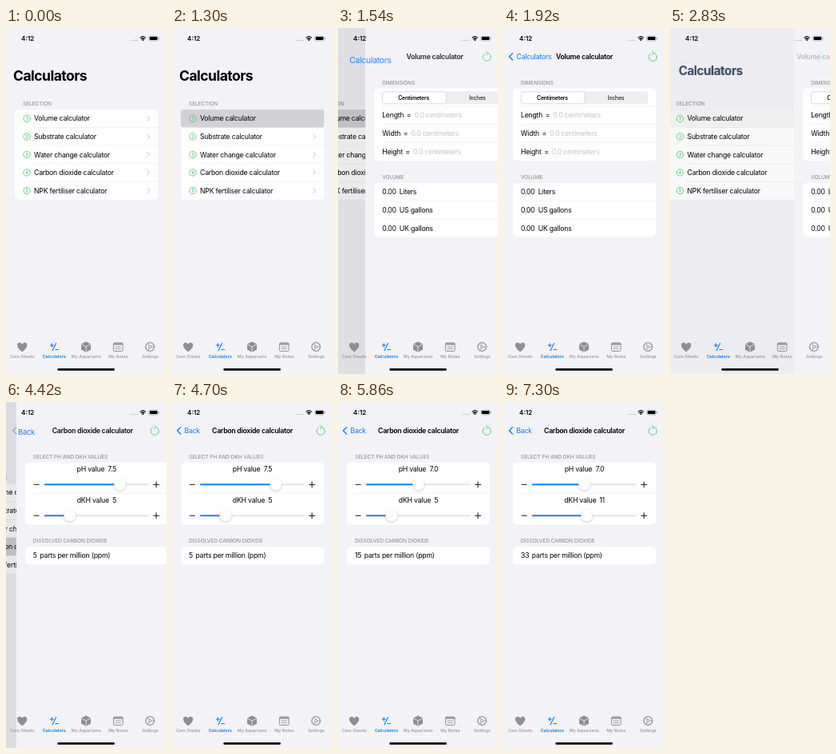
Recreate the animation shown at these times as an HTML page. Size 200x433 px, loop 8 s.

```html
<!DOCTYPE html>
<html lang="en">
<head>
<meta charset="utf-8">
<title>Calculators</title>
<style>
  html, body { margin: 0; width: 100%; height: 100%; overflow: hidden; background: #f2f2f7; }
  svg { display: block; width: 200px; height: 433px; overflow: hidden; }
  text { font: 400 8.7px Inter, Roboto, sans-serif; letter-spacing: -.025em; fill: #000; }
  text.head { font-size: 6.6px; letter-spacing: -.012em; fill: #85858b; }
  text.nav { font-weight: 600; letter-spacing: -.031em; text-anchor: middle; }
  text.large { font-size: 17.5px; font-weight: 700; letter-spacing: -.03em; }
  text.link { fill: #0a7cff; }
  text.mid { text-anchor: middle; }
  text.seg { font-size: 6.9px; text-anchor: middle; }
  text.picked { font-weight: 600; }
  text.num { font-size: 5.2px; font-weight: 500; letter-spacing: 0; text-anchor: middle; fill: #34c759; }
  text.tab { font-size: 5.3px; font-weight: 500; letter-spacing: 0; text-anchor: middle; fill: #929297; }
  text.on { fill: #0a7cff; font-weight: 600; }
  text.clock { font-size: 8px; font-weight: 600; letter-spacing: 0; text-anchor: middle; }
  .hint { fill: #c4c4c7; letter-spacing: -.035em; }
  .line { stroke: #dededf; stroke-width: .4; }
  .thumb { fill: #fff; filter: drop-shadow(0 1px 1.6px rgba(0,0,0,.22)); }
  .stroke { fill: none; stroke-linecap: round; stroke-linejoin: round; }
</style>
</head>
<body>
<svg id="stage" viewBox="0 0 200 433"></svg>
<script>
const LOOP = 8000;
const BG = '#f2f2f7', GRAY = '#8e8e93', BLUE = '#0a7cff', GREEN = '#4fcf70';

const text = (x, y, s, cls = '', id = '') =>
  `<text x="${x}" y="${y}" class="${cls}" id="${id}">${s}</text>`;
const rect = (x, y, w, h, r, fill, extra = '') =>
  `<rect x="${x}" y="${y}" width="${w}" height="${h}" rx="${r}" fill="${fill}" ${extra}/>`;
const path = (d, color, width, extra = '') =>
  `<path class="stroke" d="${d}" stroke="${color}" stroke-width="${width}" ${extra}/>`;
const card = (y, h) => rect(11, y, 179, h, 5, '#fff');
const line = (x, y) => `<path class="line" d="M${x} ${y}H190"/>`;
const gap = (s, dx = 3.5, cls = '', id = '') =>
  `<tspan dx="${dx}" class="${cls}" id="${id}">${s}</tspan>`;

// List of calculators
const ROW = 22.55;
const rowTop = i => 102 + i * ROW;
const names = ['Volume calculator', 'Substrate calculator', 'Water change calculator',
  'Carbon dioxide calculator', 'NPK fertiliser calculator'];

function listRow(name, i) {
  const y = rowTop(i) + 11.3;
  return `<circle cx="26" cy="${y}" r="4.2" fill="none" stroke="#34c759" stroke-width=".75"/>`
    + text(26, y + 1.9, i + 1, 'num') + text(35, y + 3.1, name)
    + path(`M176.6 ${y - 2.9}l2.8 2.9l-2.8 2.9`, '#c0c0c4', .95)
    + (i ? line(35, rowTop(i)) : '');
}

const list = text(21, 97.3, 'SELECTION', 'head') + card(102, 5 * ROW)
  + rect(11, rowTop(0), 179, ROW, 3, '#d1d1d6', 'id="hit0"')
  + rect(11, rowTop(3), 179, ROW, 0, '#d1d1d6', 'id="hit3"')
  + names.map(listRow).join('');

// Volume page
const field = (name, y) =>
  text(21, y, name + gap('=') + gap('0.0 centimeters', 4.2, 'hint'));
const amount = (unit, y) => text(21, y, '0.00' + gap(unit, 4));

const volume = text(21, 70.5, 'DIMENSIONS', 'head') + card(75.5, 90.5)
  + rect(21, 79.3, 159, 16, 4, '#eeeeef')
  + rect(22, 80.3, 78.5, 14, 3.4, '#fff', 'style="filter:drop-shadow(0 .6px .9px rgba(0,0,0,.2))"')
  + text(60.5, 89.6, 'Centimeters', 'seg picked') + text(140, 89.6, 'Inches', 'seg')
  + line(21, 98) + field('Length', 112.4) + line(21, 120.7) + field('Width', 135)
  + line(21, 143.3) + field('Height', 157.5)
  + text(21, 188.6, 'VOLUME', 'head') + card(194, 67.5)
  + amount('Liters', 208.4) + line(21, 216.5) + amount('US gallons', 231)
  + line(21, 239) + amount('UK gallons', 253.5);

// Carbon dioxide page
const slider = (id, y, color) =>
  path(`M22.3 ${y}h6`, '#111', 1) + path(`M171.5 ${y}h7M175 ${y - 3.5}v7`, '#111', 1)
  + rect(35, y - 1, 131, 2, 1, '#e4e4e6') + rect(35, y - 1, 50, 2, 1, color, `id="${id}Fill"`)
  + `<circle class="thumb" id="${id}Thumb" cy="${y}" r="7.3"/>`;

const carbon = text(21, 70.5, 'SELECT PH AND DKH VALUES', 'head') + card(75.5, 78)
  + text(100.5, 87.2, 'pH value' + gap('7.5', 4.2, '', 'phText'), 'mid') + slider('ph', 103.3, '#0f86fb')
  + line(21, 114.3)
  + text(100.5, 125.7, 'dKH value' + gap('5', 4.2, '', 'dkhText'), 'mid') + slider('dkh', 142.2, '#347fdf')
  + text(21, 176.3, 'DISSOLVED CARBON DIOXIDE', 'head') + card(181, 22.5)
  + text(21, 195.3, '<tspan id="ppm"></tspan>' + gap('parts per million (ppm)'));

// Fixed bars
const tab = (x, name, cls = '') => text(x, 413, name, 'tab ' + cls);
let teeth = '';
for (let i = 0; i < 12; i++) {
  const a = i * Math.PI / 6, c = Math.cos(a), s = Math.sin(a);
  teeth += `M${180 + 5.4 * c} ${399 + 5.4 * s}L${180 + 5.9 * c} ${399 + 5.9 * s}`;
}

const bars = text(27.2, 16, '4:12', 'clock')
  + [156, 158.7, 161.4, 164].map(x => `<circle cx="${x}" cy="15.4" r=".75" fill="#b4b4b8"/>`).join('')
  + path('M167.9 12.1q3.2-2.9 6.4 0', '#000', 1.2) + path('M169.3 13.8q1.8-1.6 3.6 0', '#000', 1.2)
  + '<circle cx="171.1" cy="15.2" r=".9"/>'
  + rect(178.7, 10.2, 11.4, 5.8, 1.7, 'none', 'stroke="#88888c" stroke-width=".6"')
  + rect(179.6, 11.1, 9.6, 4, 1, '#000') + rect(190.7, 12, .7, 2.2, .3, '#88888c')
  + `<path d="M20.2 405.2C16.5 402.2 14 399.8 14 396.9C14 393.3 18.5 392.6 20.2 395.8C21.9 392.6 26.4 393.3 26.4 396.9C26.4 399.8 23.9 402.2 20.2 405.2Z" fill="${GRAY}"/>`
  + path('M55.2 397h4.2M57.3 394.9v4.2M58 403.8l4.6-9.2M61.8 402.5h3.8', BLUE, 1.1)
  + `<path d="M100 392.4l6 3.2v6.8l-6 3.3l-6-3.3v-6.8z" fill="${GRAY}"/>`
  + path('M94.2 395.8l5.8 3.2l5.8-3.2M100 399v6.6', BG, .8)
  + rect(134.4, 394, 11.6, 10.4, 1.6, 'none', `stroke="${GRAY}" stroke-width="1"`)
  + path('M135 395.5h10.4', GRAY, 2)
  + path('M137 398.9h6.4M137 401.4h6.4', GRAY, .8)
  + `<circle cx="180" cy="399" r="5.2" fill="none" stroke="${GRAY}" stroke-width="1.1"/>`
  + `<circle cx="180" cy="399" r="1.6" fill="none" stroke="${GRAY}" stroke-width=".8"/>`
  + path(teeth, GRAY, 1) + path('M181.6 399h3.4M179.2 397.6l-1.7-3M179.2 400.4l-1.7 3', GRAY, .8)
  + tab(20.3, 'Care Sheets') + tab(60.3, 'Calculators', 'on') + tab(100.2, 'My Aquariums')
  + tab(140.3, 'My Notes') + tab(180.3, 'Settings')
  + rect(64.3, 426, 71.5, 2.7, 1.3, '#000');

const page = (id, body) => `<g id="${id}">${rect(0, 0, 200, 433, 0, BG)}${body}</g>`;
document.getElementById('stage').innerHTML =
  page('list', list) + rect(0, 0, 200, 433, 0, '#000', 'id="dim"')
  + page('volume', volume) + page('carbon', carbon)
  + `<g id="morph">${text(0, 0, 'Calculators', 'large', 'bigTitle')}
     <g transform="scale(2)">${text(0, 0, 'Calculators', 'link', 'backList')}${text(0, 0, 'Back', 'link', 'backShort')}</g></g>`
  + path('M10.7 31.6l-4.2 4.2l4.2 4.2', BLUE, 1.3, 'id="chevron"')
  + text(100.5, 38.7, 'Volume calculator', 'nav', 'volumeTitle')
  + text(100.5, 38.7, 'Carbon dioxide calculator', 'nav', 'carbonTitle')
  + `<g id="reset">${path('M187.6 31.4A5.1 5.1 0 1 1 183.3 31.9', GREEN, 1)}${path('M184.9 29.5l2.8 1.9l-2.4 2.3', GREEN, .9)}</g>`
  + bars;

const el = {};
document.querySelectorAll('[id]').forEach(n => { if (n.id) el[n.id] = n; });
const set = (id, name, value) => el[id].setAttribute(name, value);
const clamp = v => Math.max(0, Math.min(1, v));
const mix = (a, b, p) => a + (b - a) * p;
const fade = (id, v) => set(id, 'opacity', clamp(v));
const move = (id, x) => set(id, 'transform', `translate(${x} 0)`);

// Critically damped spring from 0 to 1
function spring(ms, rate) {
  if (ms <= 0) return 0;
  const left = (1 + rate * ms) * Math.exp(-rate * ms);
  return left < .003 ? 1 : 1 - left;
}

// Value moving in equal jumps, the first one at the start time
function jumps(t, start, gapMs, count, from, to) {
  const n = Math.max(0, Math.min(count, Math.floor((t - start) / gapMs) + 1));
  return mix(from, to, n / count);
}

function setSlider(id, ratio) {
  const x = mix(42.3, 158.7, ratio);
  set(id + 'Thumb', 'cx', x);
  set(id + 'Fill', 'width', x - 35);
}

const POP = 2688, TITLE_LAG = 10;
const volumeShown = t => t < POP ? spring(t - 1357, .0175) : 1 - spring(t - POP, .02);
const carbonShown = t => spring(t - 4172, .0179);

function render(t) {
  const v = volumeShown(t), c = carbonShown(t);
  const p = Math.max(v, c);

  move('list', -60 * p);
  fade('dim', .1 * p);
  move('volume', 200 * (1 - v));
  move('carbon', 200 * (1 - c));
  fade('hit0', t < 1300 ? 0 : t < POP ? 1 : v);
  fade('hit3', t < 4130 ? 0 : 1);
  move('volumeTitle', 120 * (1 - v));
  move('carbonTitle', 120 * (1 - c));
  fade('volumeTitle', v);
  fade('carbonTitle', c);
  fade('reset', p);

  // The large title shrinks into the back button
  const q = Math.max(volumeShown(t - TITLE_LAG), carbonShown(t - TITLE_LAG));
  const pressed = t >= 2540 && t < POP ? .3 : 1;
  set('morph', 'transform', `translate(${mix(9, 15.5, q)} ${mix(66, 38.7, q)}) scale(${mix(1, .5, q)})`);
  fade('bigTitle', 1 - 1.2 * q);
  fade('backList', v * pressed);
  fade('backShort', c);
  fade('chevron', (q - .86) / .14 * pressed);
  move('chevron', 30 * (1 - q));

  const ph = jumps(t, 5620, 60, 5, 7.5, 7);
  const dkh = Math.round(jumps(t, 7150, 50, 4, 5, 11));
  setSlider('ph', (ph - 6) / 2);
  setSlider('dkh', (dkh - 1) / 19);
  el.phText.textContent = ph.toFixed(1);
  el.dkhText.textContent = dkh;
  el.ppm.textContent = Math.round(3 * dkh * 10 ** (7 - ph));
}

let start;
function tick(now) {
  start ??= now;
  render((now - start) % LOOP);
  requestAnimationFrame(tick);
}
render(0);
requestAnimationFrame(tick);
</script>
</body>
</html>
```
